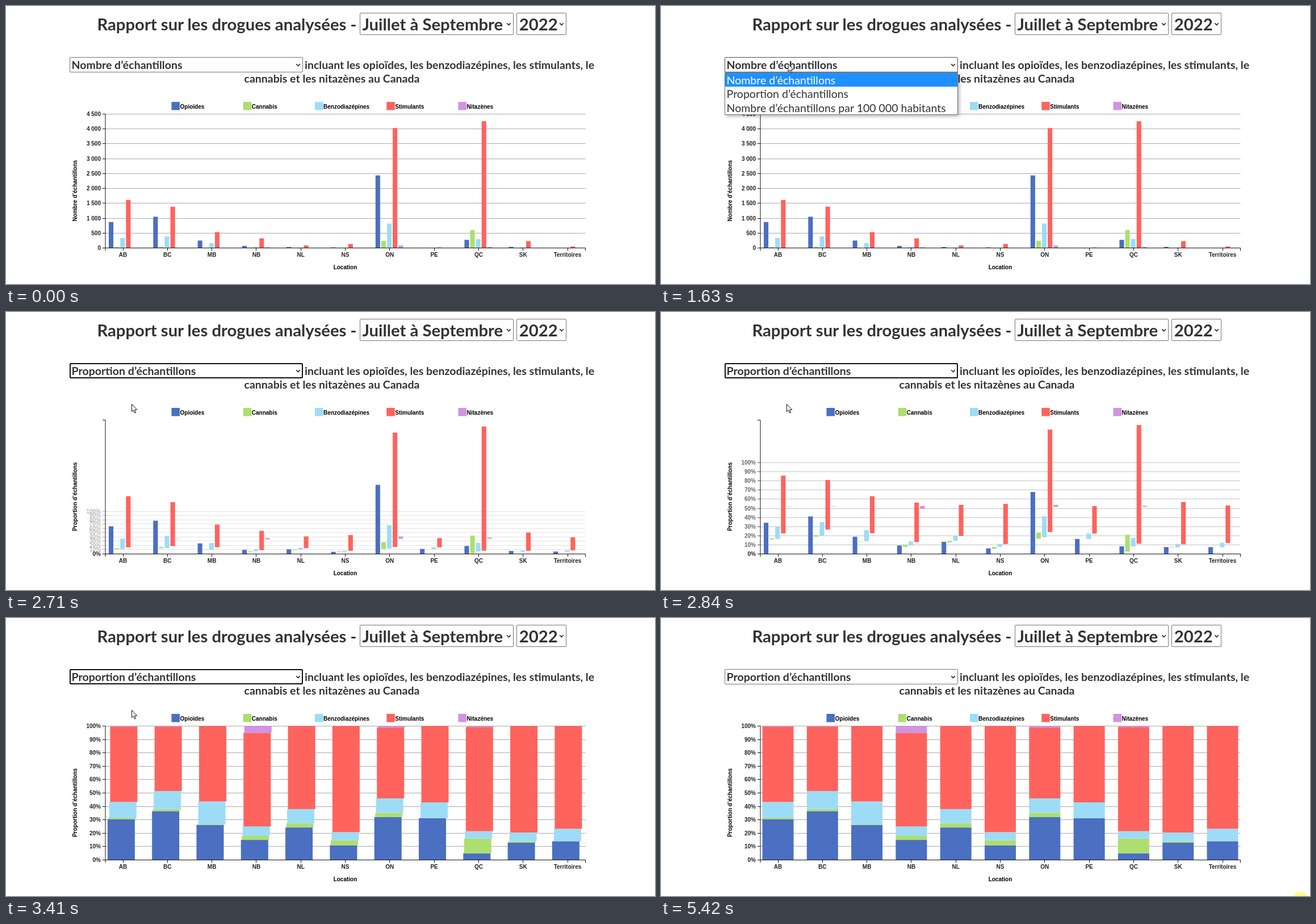
An HTML page for the animation above (5490 ms loop, 1143 by 490 pixels).

```html
<!DOCTYPE html>
<html lang="fr">
<head>
<meta charset="utf-8">
<title>Drogues analysées</title>
<style>
  html, body { margin: 0; width: 100%; height: 100%; overflow: hidden; background: #fff; }
  svg { display: block; width: 100vw; height: 100vh; }
  .lato { font-family: Lato, sans-serif; fill: #333; }
  .title { font-size: 29.28px; font-weight: 700; }
  .sub { font-size: 19.52px; font-weight: 700; }
  .option { font-size: 19.52px; }
  .label { font: bold 10px "Liberation Sans", Arial, sans-serif; fill: #000; }
  .axis .label { fill: #222; }
  .box { fill: #fff; stroke: #767676; }
  .chevron { fill: none; stroke: #222; stroke-width: 1.6; }
  .line { stroke: #111; fill: none; }
  .grid { stroke: #aaa; }
  #popup { filter: drop-shadow(2px 2px 3px rgba(0, 0, 0, .35)); }
</style>
</head>
<body>
<svg id="stage" viewBox="0 0 1143 490"></svg>
<script>
const LOOP = 5490, STEP = 70;
const OPEN = 1560, CHOOSE = 2500, BLUR = 5420;
const AXIS_START = 2495, STACK_START = 2557, WIDEN_START = 3077, DURATION = 500;
const LEFT = 175, RIGHT = 1020.5, BASE = 426.5, HEIGHT = 236;
const BAND = 78.3, BAND_WIDTH = 55, BAR_STEP = 10.1, BAR_WIDTH = 8.1;
const ROW = 24.4, POPUP_TOP = 117.8;

const series = [
  ['Opioïdes', '#4b6fc1'], ['Cannabis', '#addf6e'], ['Benzodiazépines', '#9ddcf6'],
  ['Stimulants', '#ff635e'], ['Nitazènes', '#d094e3']
];
// Place, number of samples, then the running percentage after each of the first four series.
const places = [
  ['AB', 2860, 30.5, 31.6, 43.3, 99.7], ['BC', 2877, 36.5, 38, 51.5, 99.7],
  ['MB', 950, 26.2, 26.8, 43.7, 100], ['NB', 464, 15, 18, 25, 95],
  ['NL', 137, 24.3, 27.5, 38, 100], ['NS', 170, 11, 14.8, 20.8, 100],
  ['ON', 7620, 32, 35.2, 46, 98.9], ['PE', 32, 31.2, 31.2, 43, 100],
  ['QC', 5475, 5, 16, 21.5, 99.3], ['SK', 290, 13, 14, 20.5, 100],
  ['Territoires', 65, 14, 14, 23.3, 100]
];
const options = ['Nombre d’échantillons', 'Proportion d’échantillons',
  'Nombre d’échantillons par 100 000 habitants'];
// Pointer tip: time, x, y. Each position holds until the next one.
const pointerPath = [
  [590, 6, 377], [660, 34, 270], [730, 70, 150], [800, 112, 60],
  [930, 148, 6], [1000, 168, 20], [1070, 182, 40],
  [1140, 195.5, 61], [1210, 207, 77], [1280, 217, 91], [1350, 222, 99], [1420, 224, 102.5],
  [1890, 224, 118], [1960, 225, 146], [2030, 225, 174],
  [2170, 225, 171], [2230, 223, 166], [2300, 221.5, 162.5],
  [3880, 102, 143.5], [3950, -50, 130]
];

const stage = document.getElementById('stage');
function add(parent, tag, attrs = {}, text) {
  const el = document.createElementNS('http://www.w3.org/2000/svg', tag);
  set(el, attrs);
  if (text !== undefined) el.textContent = text;
  parent.append(el);
  return el;
}
function set(el, attrs) {
  for (const name in attrs) el.setAttribute(name, attrs[name]);
}
const show = (el, visible) => el.setAttribute('visibility', visible ? 'visible' : 'hidden');
const write = (parent, cls, x, y, text, anchor = 'start') =>
  add(parent, 'text', { class: cls, x, y, 'text-anchor': anchor }, text);
const mix = (a, b, p) => a + (b - a) * p;
function ease(t, start) {
  const u = Math.min(1, Math.max(0, (t - start) / DURATION));
  return u < .5 ? 4 * u ** 3 : 1 - 4 * (1 - u) ** 3;
}
const sharp = y => Math.floor(y) + .5;

function addSelect(x, y, right, bottom) {
  const box = add(stage, 'rect', { class: 'box', x, y, width: right - x, height: bottom - y, rx: 1.5 });
  const cx = right - 8, cy = (y + bottom) / 2 - 1.3;
  add(stage, 'path', { class: 'chevron', d: `M${cx - 3.3} ${cy}l3.3 3.3 3.3-3.3` });
  return box;
}

write(stage, 'lato title', 160.4, 43, 'Rapport sur les drogues analysées -');
addSelect(623.5, 12.5, 893.5, 50.5);
write(stage, 'lato title', 627.4, 43, 'Juillet à Septembre');
addSelect(899.5, 12.5, 986.5, 50.5);
write(stage, 'lato title', 903.8, 43, '2022');
const measure = addSelect(112.5, 90.5, 522.5, 116.5);
const measureText = write(stage, 'lato sub', 115.6, 111, options[0]);
const focusRing = add(stage, 'rect', {
  x: 113, y: 91, width: 409, height: 25, rx: 2, fill: 'none', stroke: '#101010', 'stroke-width': 2
});
write(stage, 'lato sub', 526, 111, 'incluant les opioïdes, les benzodiazépines, les stimulants, le');
write(stage, 'lato sub', 574, 135, 'cannabis et les nitazènes au Canada', 'middle');

series.forEach(([name, fill], j) => {
  const x = 291.5 + 126.25 * j;
  add(stage, 'rect', { x, y: 169, width: 14.5, height: 14.5, fill });
  write(stage, 'label', x + 15, 181, name);
});

const axis = add(stage, 'g', { class: 'axis' });
function addTick(text) {
  const g = add(axis, 'g');
  add(g, 'path', { class: 'grid', d: `M${LEFT} 0H${RIGHT}` });
  add(g, 'path', { class: 'line', d: `M170 0H${LEFT}` });
  write(g, 'label', 167, 3.6, text, 'end');
  return g;
}
const place = (tick, y) => tick.setAttribute('transform', `translate(0 ${sharp(y)})`);
const countTicks = Array.from({ length: 10 }, (_, k) => {
  const n = k * 500;
  const tick = addTick(n < 1000 ? n : `${Math.floor(n / 1000)} ${String(n % 1000).padStart(3, '0')}`);
  place(tick, BASE - HEIGHT * k / 9);
  return tick;
});
const shareTicks = Array.from({ length: 11 }, (_, k) => addTick(k * 10 + '%'));

const bars = [];
places.forEach(([, total, ...running], i) => {
  const shares = [0, ...running, 100];
  series.forEach(([, fill], j) => {
    const from = shares[j] / 100, to = shares[j + 1] / 100;
    bars.push({
      el: add(stage, 'rect', { fill }), from, to, j,
      count: (to - from) * total / 4500,
      band: 178.5 + BAND * i
    });
  });
});

add(stage, 'path', {
  class: 'line', d: `M170 190.5H${LEFT}V${BASE}M${LEFT} 431.5V${BASE}H${RIGHT}V431.5`
});
const placeAxis = add(stage, 'g', { class: 'axis' });
places.forEach(([name], i) => {
  const x = 206 + BAND * i;
  add(placeAxis, 'path', { class: 'line', d: `M${sharp(x)} ${BASE}v5` });
  write(placeAxis, 'label', x, 441.5, name, 'middle');
});
write(stage, 'label', 597.5, 464, 'Location', 'middle');
const axisTitle = write(stage, 'label', 0, 0, '', 'middle');
axisTitle.setAttribute('transform', 'translate(124.5 325.5) rotate(-90)');

const popup = add(stage, 'g', { id: 'popup' });
add(popup, 'rect', { class: 'box', x: 112.5, y: 117.3, width: 410, height: 74 });
const highlight = add(popup, 'rect', { x: 113, width: 409, height: ROW, fill: '#1e90ff' });
const optionTexts = options.map((text, k) =>
  write(popup, 'lato option', 115.6, 137.8 + ROW * k, text));

const clickSpot = add(stage, 'circle', { cx: 1126, cy: 497, r: 14, fill: '#ffff7d' });
const pointer = add(stage, 'path', {
  d: 'M0 0V13.2L3 10.4 5 15.5 7.1 14.6 5 9.7H9.2Z', fill: '#fff', stroke: '#111', 'stroke-linejoin': 'round'
});

function drawChart(t) {
  const chosen = t >= CHOOSE;
  const axisP = ease(t, AXIS_START), stackP = ease(t, STACK_START), widenP = ease(t, WIDEN_START);
  countTicks.forEach(tick => show(tick, !chosen));
  shareTicks.forEach((tick, k) => {
    show(tick, chosen);
    place(tick, BASE - HEIGHT * k / 10 * axisP);
    tick.setAttribute('opacity', k ? axisP : 1);
  });
  for (const { el, from, to, j, count, band } of bars) {
    const bottom = mix(0, from, stackP), top = mix(count, to, stackP);
    set(el, {
      x: band + mix(2.5 + BAR_STEP * j, 0, widenP),
      width: mix(BAR_WIDTH, BAND_WIDTH, widenP),
      y: BASE - HEIGHT * top,
      height: HEIGHT * Math.max(0, top - bottom)
    });
  }
  axisTitle.textContent = options[+chosen];
}

function drawControls(t) {
  const chosen = t >= CHOOSE, opened = t >= OPEN && !chosen;
  const spot = pointerPath.findLast(([start]) => t >= start);
  show(pointer, spot);
  if (spot) pointer.setAttribute('transform', `translate(${spot[1]} ${spot[2]})`);

  measureText.textContent = options[+chosen];
  measure.style.stroke = t >= 1280 && !chosen ? '#4f4f4f' : '';
  show(focusRing, chosen && t < BLUR);
  show(clickSpot, t >= BLUR);
  popup.style.display = opened ? '' : 'none';
  if (opened) {
    const row = Math.min(2, Math.max(0, Math.floor((spot[2] - POPUP_TOP) / ROW)));
    highlight.setAttribute('y', POPUP_TOP + ROW * row);
    optionTexts.forEach((el, k) => { el.style.fill = k === row ? '#fff' : ''; });
  }
}

function render(now) {
  const t = now % LOOP;
  drawChart(CHOOSE + Math.floor((t - CHOOSE) / STEP) * STEP);
  drawControls(t);
}

let begin;
function frame(now) {
  begin ??= now;
  render(now - begin);
  requestAnimationFrame(frame);
}
render(0);
requestAnimationFrame(frame);
</script>
</body>
</html>
```
